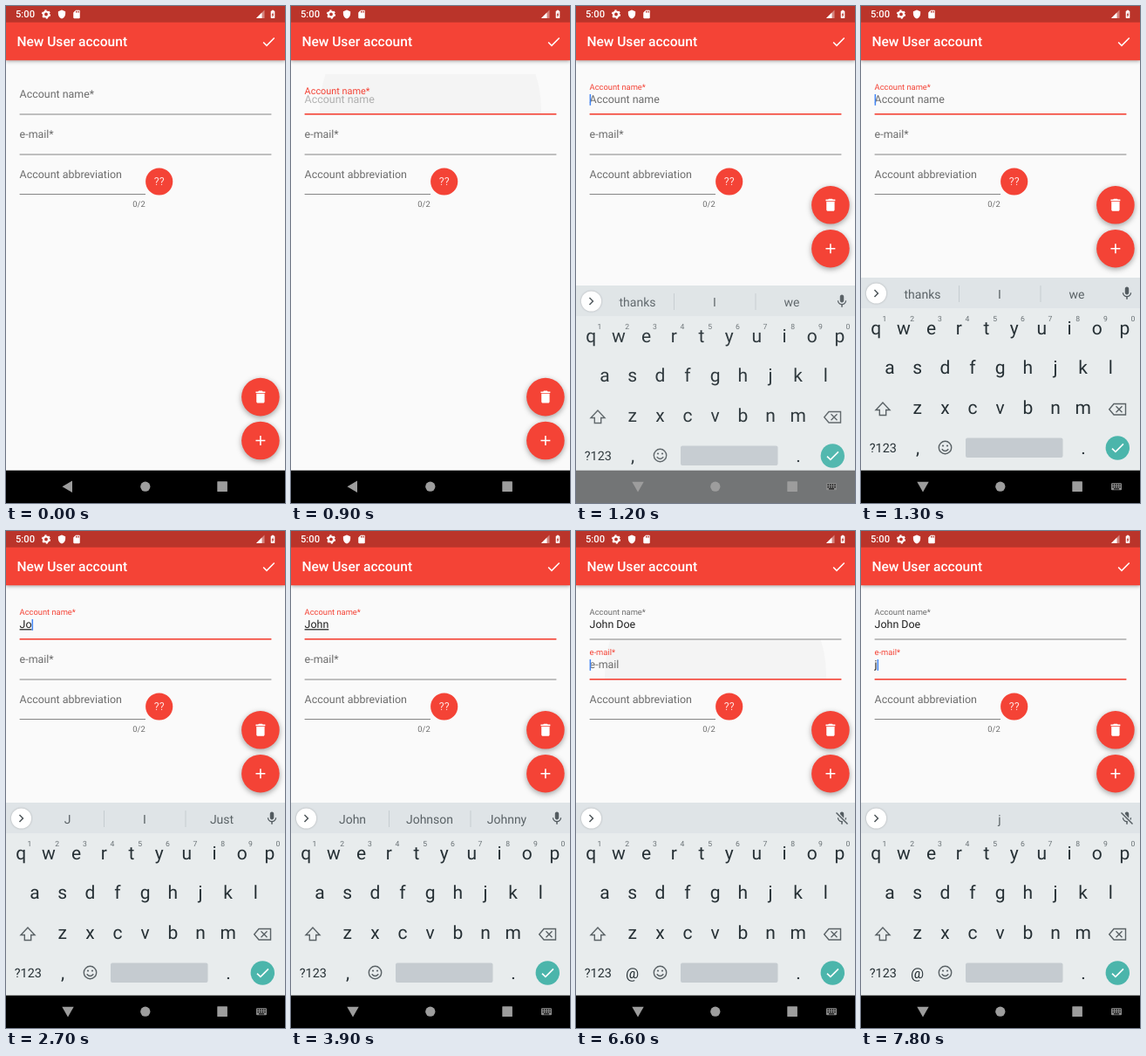
An HTML page for the animation above (8 s loop, 320x569 px).

```html
<!DOCTYPE html>
<html lang="en">
<head>
<meta charset="utf-8">
<title>New User account</title>
<style>
html, body { margin: 0; width: 100%; height: 100%; overflow: hidden; background: #fafafa; }
svg { display: block; width: 320px; height: 569px; font-family: Roboto, "Noto Sans", sans-serif; }
text { white-space: pre; text-rendering: geometricPrecision; }
.mid { text-anchor: middle; }
.bar { filter: drop-shadow(0 1.5px 2px rgba(0,0,0,.35)); }
.fab { filter: drop-shadow(0 2.5px 3px rgba(0,0,0,.36)); }
.line { fill: none; stroke: #5a6266; stroke-width: 1.4; }
.composing { text-decoration: underline; text-decoration-skip-ink: none; }
</style>
</head>
<body>
<svg id="stage" viewBox="0 0 320 569"></svg>
<script>
const LOOP = 8000, STEP = 100;
const RED = '#f44336', GREY = '#6c6c6c', INK = '#263035', LEFT = 15.6, RIGHT = 304.4;
const DP = 320 / 411.4;

const ICONS = {
  bin: 'M6 19c0 1.1.9 2 2 2h8c1.1 0 2-.9 2-2V7H6v12zM19 4h-3.5l-1-1h-5l-1 1H5v2h14V4z',
  plus: 'M19 13h-6v6h-2v-6H5v-2h6V5h2v6h6v2z',
  check: 'M9 16.17L4.83 12l-1.42 1.41L9 19 21 7l-1.41-1.41z',
  shield: 'M12 1L3 5v6c0 5.55 3.84 10.74 9 12 5.16-1.26 9-6.45 9-12V5z',
  card: 'M18 2h-8L4 8v12c0 1.1.9 2 2 2h12c1.1 0 2-.9 2-2V4c0-1.1-.9-2-2-2zM12 8h-2V4h2zm3 0h-2V4h2zm3 0h-2V4h2z',
  battery: 'M15.7 4H14V2h-4v2H8.3Q7 4 7 5.3v15.4Q7 22 8.3 22h7.4q1.3 0 1.3-1.3V5.3Q17 4 15.7 4zM11 20v-5.5H9L13 7v5.5h2z',
  mic: 'M12 14c1.66 0 3-1.34 3-3V5c0-1.66-1.34-3-3-3S9 3.34 9 5v6c0 1.66 1.34 3 3 3zm5.3-3c0 3-2.54 5.1-5.3 5.1S6.7 14 6.7 11H5c0 3.41 2.72 6.23 6 6.72V21h2v-3.28c3.28-.48 6-3.3 6-6.72z',
  next: 'M10 6L8.59 7.41 13.17 12l-4.58 4.59L10 18l6-6z'
};

const icon = (name, x, y, fill, scale = DP) =>
  `<path d="${ICONS[name]}" fill="${fill}" fill-rule="evenodd" transform="translate(${x} ${y}) scale(${scale}) translate(-12 -12)"/>`;
const text = (str, x, y, size, fill, attrs = '') =>
  `<text x="${x}" y="${y}" font-size="${size}" fill="${fill}" ${attrs}>${str}</text>`;
const rect = (x, y, w, h, fill, attrs = '') =>
  `<rect x="${x}" y="${y}" width="${w}" height="${h}" fill="${fill}" ${attrs}/>`;
const circle = (x, y, r, fill, attrs = '') =>
  `<circle cx="${x}" cy="${y}" r="${r}" fill="${fill}" ${attrs}/>`;

function field(id, top, label) {
  return `<clipPath id="${id}Clip">${rect(LEFT, top, RIGHT - LEFT, 46, '#000')}</clipPath>
    ${circle(160, top + 40, 0, '#000', `id="${id}Ripple" clip-path="url(#${id}Clip)"`)}
    ${rect(LEFT, top + 45.5, RIGHT - LEFT, 1, '#868686', `id="${id}Rule"`)}
    ${text(label + '*', LEFT, top + 27, 12.45, GREY, `id="${id}Label"`)}
    ${text(label, LEFT, top + 33.2, 12.45, GREY, `id="${id}Hint"`)}
    <text id="${id}Value" x="${LEFT}" y="${top + 33.2}" font-size="12.45" fill="#1f1f1f"><tspan></tspan><tspan class="composing"></tspan></text>
    ${rect(LEFT, top + 23, 1.5, 12.8, '#4285f4', `id="${id}Caret"`)}`;
}

function statusBar() {
  return rect(0, 0, 320, 18.7, '#ba342a')
    + text('5:00', 11, 13.4, 11.2, '#fff', 'font-weight="500"')
    + circle(46, 9.5, 3, 'none', 'stroke="#fff" stroke-width="2.2"')
    + circle(46, 9.5, 4.4, 'none', 'stroke="#fff" stroke-width="1.5" stroke-dasharray="2.3 2.308"')
    + icon('shield', 64, 9.5, '#fff', .46) + icon('card', 81, 9.5, '#fff', .47)
    + '<path d="M287 14h9.5V4.5z" fill="#fff" opacity=".4"/><path d="M287 14h6.5V7.5z" fill="#fff"/>'
    + icon('battery', 306, 9.3, '#fff', .46);
}

function letterRow(letters, x, y) {
  return [...letters].map((c, i) => text(c, x + i * 31.67, y, 21, INK, 'class="mid"')).join('');
}

function keyboard() {
  const digits = [...'1234567890'].map((d, i) =>
    text(d, 27 + i * 31.67, 360.6, 8.6, '#687074', 'class="mid"')).join('');
  const words = [70.5, 159, 247.5].map((x, i) =>
    text('', x, 334.5, 14, '#5a6266', `class="mid" id="word${i}"`)).join('');
  return rect(0, 311, 320, 258, '#e8eced') + rect(0, 311, 320, 35, '#dfe4e7')
    + circle(17.5, 329, 11.6, '#fff', 'style="filter:drop-shadow(0 .7px .8px rgba(0,0,0,.25))"')
    + icon('next', 17.5, 329, '#50585c', .75) + words
    + `<g id="dividers">${rect(112, 320, 1, 19, '#c6ccd0')}${rect(205.5, 320, 1, 19, '#c6ccd0')}</g>`
    + icon('mic', 305, 329, '#535b60', .74)
    + '<path id="micOff" d="M298.5 322l13 14" stroke="#dfe4e7" stroke-width="3.4"/><path id="micSlash" d="M298.5 322.5l13 13" stroke="#535b60" stroke-width="1.4"/>'
    + letterRow('qwertyuiop', 17.3, 375.7) + digits
    + letterRow('asdfghjkl', 33, 421) + letterRow('zxcvbnm', 64.7, 467)
    + '<path class="line" d="M25 454l-8 8.5h4.3v6h7.4v-6h4.3z"/>'
    + '<path class="line" d="M290 455.5h13.5v12.5H290l-5.3-6.2zM292.5 458.3l7 7m0-7l-7 7"/>'
    + text('?123', 25.3, 511, 14.4, INK, 'class="mid"')
    + text(',', 65, 513, 21, INK, 'class="mid" id="comma"')
    + text('@', 64.5, 511.5, 16.8, INK, 'class="mid" id="at"')
    + circle(96.5, 505.5, 7.2, 'none', 'class="line"')
    + circle(94, 503.5, 1.1, '#5a6266') + circle(99, 503.5, 1.1, '#5a6266')
    + '<path class="line" d="M92.7 507.3q3.8 4.4 7.6 0"/>'
    + rect(120, 494.5, 111.5, 22.5, '#c5cbd0', 'rx="2"')
    + text('.', 255, 512.5, 21, INK, 'class="mid"')
    + circle(294.3, 506, 13.7, '#4bb5ab') + icon('check', 294.3, 506, '#fff', .8);
}

function navBar() {
  const keys = [0, 1, 2, 3].map(i => rect(288.5 + i * 2.6, 547.5, 1.4, 1.4, '#000') + rect(288.5 + i * 2.6, 550, 1.4, 1.4, '#000')).join('');
  return rect(0, 531.7, 320, 38, '#000', 'id="navBack"')
    + `<g fill="#9d9d9d"><path id="back" d="M64.5 550.3l11.5-6.7v13.4z"/><path id="down" d="M64.3 544.8h13.4l-6.7 11.6z"/></g>`
    + circle(159.8, 550.2, 5.6, '#9d9d9d') + rect(242.3, 544.3, 11.6, 11.8, '#9d9d9d', 'rx=".5"')
    + `<g id="switcher">${rect(287, 546.2, 12, 8, '#8a8a8a', 'rx="1"')}${keys}${rect(290, 552.3, 6, 1.1, '#000')}</g>`;
}

const stage = document.getElementById('stage');
stage.innerHTML = rect(0, 0, 320, 569, '#fafafa')
  + field('name', 78, 'Account name') + field('mail', 124, 'e-mail')
  + text('Account abbreviation', LEFT, 197, 12.45, GREY)
  + rect(LEFT, 215, 144.4, 1, '#868686')
  + text('0/2', 159.7, 230.4, 9.33, GREY, 'text-anchor="end"')
  + circle(175.7, 201, 15.6, RED) + text('??', 175.7, 205.4, 12.45, '#ffe0dd', 'class="mid"')
  + `<g id="fabs">${[['bin', 447.6], ['plus', 497.5]].map(([n, y]) =>
      circle(291.9, y, 21.8, RED, 'class="fab"') + icon(n, 291.9, y, '#fff')).join('')}</g>`
  + rect(0, 0, 320, 62.2, RED, 'class="bar"') + statusBar()
  + text('New User account', 12.4, 46, 15.56, '#fff', 'font-weight="500"')
  + icon('check', 301.3, 41, '#fff')
  + `<g id="keyboard">${keyboard()}</g>` + navBar();

const $ = id => document.getElementById(id);
const show = (id, on) => { $(id).style.opacity = on ? 1 : 0; };
const ramp = (t, from, length) => Math.min(1, Math.max(0, (t - from) / length));
const ease = p => p * p * (3 - 2 * p);

// Each table row: start time, then the values that hold from there.
const TYPED = {
  name: [[0, '', ''], [2100, '', 'J'], [2700, '', 'Jo'], [2900, '', 'Joh'], [3400, '', 'John'],
    [4600, 'John ', ''], [4800, 'John ', 'D'], [5000, 'John ', 'Do'], [5500, 'John ', 'Doe'], [6500, 'John Doe', '']],
  mail: [[0, '', ''], [7600, '', 'j']]
};
const WORDS = [[0, 'thanks', 'I', 'we'], [2200, 'J', 'I', 'Just'], [2800, 'Jo', 'Joe', 'John'],
  [3000, 'John', 'Johnson', 'Johnny'], [4600, 'and', 'is', 'was'], [4800, 'Do', 'Doesn\'t', 'Does'],
  [5500, 'Doe', 'Doesn\'t', 'Does'], [6500, '', '', ''], [7700, '', 'j', '']];
const CARET = [[0, 0], [1000, 1], [1700, 0], [2100, 1], [3900, 0], [4400, 1], [6000, 0], [6500, 1], [7000, 0], [7500, 1]];
const SLIDE = [[0, 52, 0], [1000, 52, .3], [1100, 34.5, .72], [1200, 9, .95], [1300, 0, 1]];
const at = (table, t) => table.filter(row => row[0] <= t).pop().slice(1);

function drawField(id, top, t, { focus, blur, float, press, fade, typed }) {
  const on = t >= focus && t < blur, p = ease(ramp(t, float, 200));
  const label = $(id + 'Label'), rule = $(id + 'Rule'), value = $(id + 'Value'), ripple = $(id + 'Ripple');
  label.setAttribute('font-size', 12.45 - 3.12 * p);
  label.setAttribute('y', top + 27 - 8.9 * p);
  label.setAttribute('fill', on ? RED : GREY);
  rule.setAttribute('fill', on ? RED : '#868686');
  rule.setAttribute('height', on ? 1.6 : 1);
  rule.setAttribute('y', top + (on ? 45 : 45.5));
  $(id + 'Hint').style.opacity = p * (1 - ramp(t, typed, 200));
  const [done, composing] = at(TYPED[id], t);
  value.children[0].textContent = done;
  value.children[1].textContent = composing;
  $(id + 'Caret').setAttribute('x', LEFT + (done + composing ? value.getComputedTextLength() : 0));
  show(id + 'Caret', on && at(CARET, t)[0]);
  ripple.setAttribute('r', 127 * ramp(t, press, 300));
  ripple.style.opacity = t < fade ? .025 : 0;
}

function draw(t) {
  const open = t >= 1000, mail = t >= 6500;
  drawField('name', 78, t, { focus: 800, blur: 6500, float: 800, press: 600, fade: 1100, typed: 2100 });
  drawField('mail', 124, t, { focus: 6500, blur: LOOP, float: 6400, press: 6300, fade: 6700, typed: 7600 });
  $('fabs').setAttribute('transform', `translate(0 ${open ? -219.8 : 0})`);
  const [drop, alpha] = at(SLIDE, t);
  $('keyboard').setAttribute('transform', `translate(0 ${drop})`);
  $('keyboard').style.opacity = alpha;
  $('navBack').style.opacity = open && t < 1300 ? .5 : 1;
  at(WORDS, t).forEach((word, i) => { $('word' + i).textContent = word; });
  show('dividers', !mail);
  show('micOff', mail);
  show('micSlash', mail);
  show('comma', !mail);
  show('at', mail);
  show('back', !open);
  show('down', open);
  show('switcher', t >= 1200);
}

const start = performance.now();
function tick() {
  const t = (performance.now() - start) % LOOP;
  draw(Math.floor(t / STEP) * STEP);
  requestAnimationFrame(tick);
}
tick();
</script>
</body>
</html>
```
